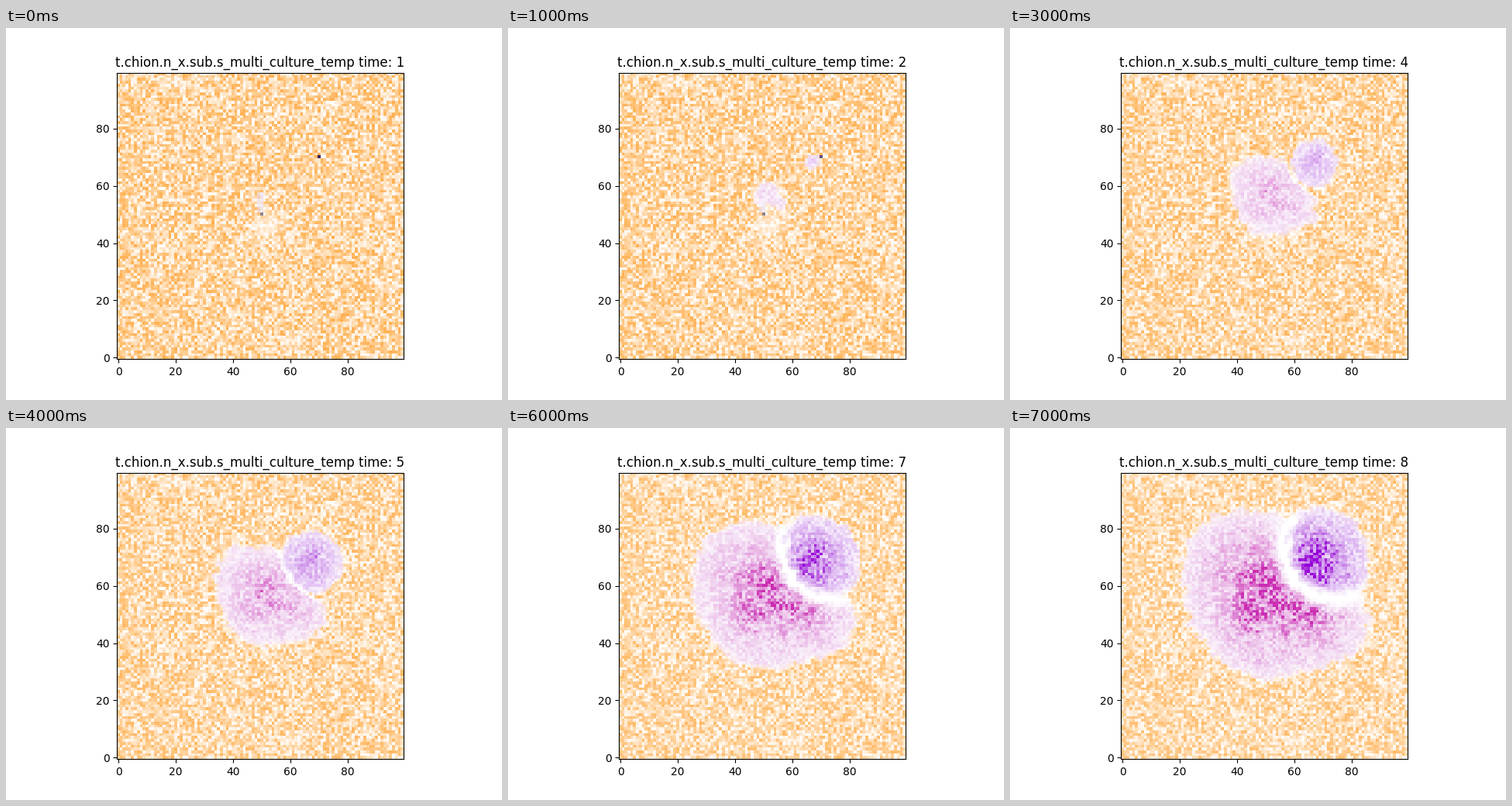
These frames come from a looping animation (640x480 px, 8 s). A matplotlib script:

```python
import numpy as np
import matplotlib.pyplot as plt
from matplotlib.animation import FuncAnimation

SIZE = 100
STEPS = 8
TITLE = "t.chion.n_x.sub.s_multi_culture_temp time: "


def rgb(*channels):
    return np.array(channels) / 255


WHITE = rgb(255, 255, 255)
ORANGE = rgb(255, 176, 80)
LILAC = rgb(232, 224, 245)
DARK = rgb(60, 35, 95)
GREY = rgb(145, 130, 145)
PINK = [WHITE, rgb(243, 219, 243), rgb(226, 150, 218), rgb(203, 45, 178)]
PURPLE = [WHITE, rgb(233, 207, 246), rgb(202, 138, 232), rgb(150, 0, 215)]
LEVELS = [0, 0.2, 0.6, 1]

rng = np.random.default_rng(7)
y, x = np.mgrid[0:SIZE, 0:SIZE].astype(float)
food = rng.random((SIZE, SIZE))


def patchy():
    """Noise of unit spread whose neighbouring cells are alike."""
    noise = rng.normal(size=(SIZE, SIZE))
    return sum(np.roll(noise, (i, j), (0, 1)) for i in range(3) for j in range(3)) / 3


def blob(cx, cy, width):
    return np.exp(-((x - cx) ** 2 + (y - cy) ** 2) / (2 * width ** 2))


def lobe(angle, direction, sharpness):
    return np.exp(sharpness * (np.cos(angle - np.radians(direction)) - 1))


def mix(a, b, amount):
    return a + (b - a) * amount


def ramp(value, colors):
    return np.stack([np.interp(value, LEVELS, c) for c in zip(*colors)], axis=-1)


# Relative distance from each colony's centre: 1 is its final outline.
ragged = 0.025 * patchy()
angle = np.arctan2(y - 56, x - 52)
pink_edge = 28.5 + 8.5 * lobe(angle, 335, 10) + 6.5 * lobe(angle, 138, 5)
pink_reach = np.hypot(x - 52, y - 56) / pink_edge + ragged
purple_reach = np.hypot(x - 67, y - 68) / 19.5 + ragged

# The two colonies meet along an arc that neither crosses.
to_wall = np.hypot(x - 75, y - 74) - 19
is_purple = to_wall < 0
gap = np.abs(to_wall + 0.6 * patchy())

vigour = 1 - 0.5 * blob(53, 44, 3.5) + 0.35 * blob(66, 49, 5) + 0.2 * patchy()
supply = food * (1 - 0.6 * blob(52, 46, 3.5))
streak = ((np.abs(x - 49.5) < 1) & (y > 50) & (y < 58))[..., None]


def culture(t):
    grown = (t - 1) / (STEPS - 1)
    age = np.where(is_purple, grown - purple_reach, grown ** 0.9 - pink_reach)

    left = supply * (1 - 0.15 * grown) * np.clip(0.6 - 8 * age, 0, 1)
    ground = mix(WHITE, ORANGE, left[..., None])
    ground = mix(ground, LILAC, 0.6 * streak)

    dense = 1.3 * np.clip(age, 0, 1) ** 1.35 * (0.2 + 0.8 * food) * vigour
    dense = np.clip(dense + 0.05 + 0.15 * food, 0, 1)
    width = max(0.3, 0.6 * (t - 4))
    dense *= np.clip((gap / width - 0.5) / 1.5, 0, 1)
    cells = np.where(is_purple[..., None], ramp(dense, PURPLE), ramp(dense, PINK))

    cover = np.where(age > 0, np.clip(0.6 + 5 * age, 0, 1), 0)
    image = mix(ground, cells, cover[..., None])
    if t <= 3:
        image[50, 50] = GREY
        image[70, 70] = mix(DARK, GREY, (t - 1) / 2)
    return np.clip(image, 0, 1)


fig, ax = plt.subplots(figsize=(6.4, 4.8), dpi=100)
picture = ax.imshow(culture(1), origin="lower", interpolation="nearest")
title = ax.set_title(f"{TITLE}1")


def update(frame):
    picture.set_data(culture(frame + 1))
    title.set_text(f"{TITLE}{frame + 1}")
    return picture, title


anim = FuncAnimation(fig, update, frames=STEPS, interval=1000, repeat=True, repeat_delay=0)
plt.show()
```
